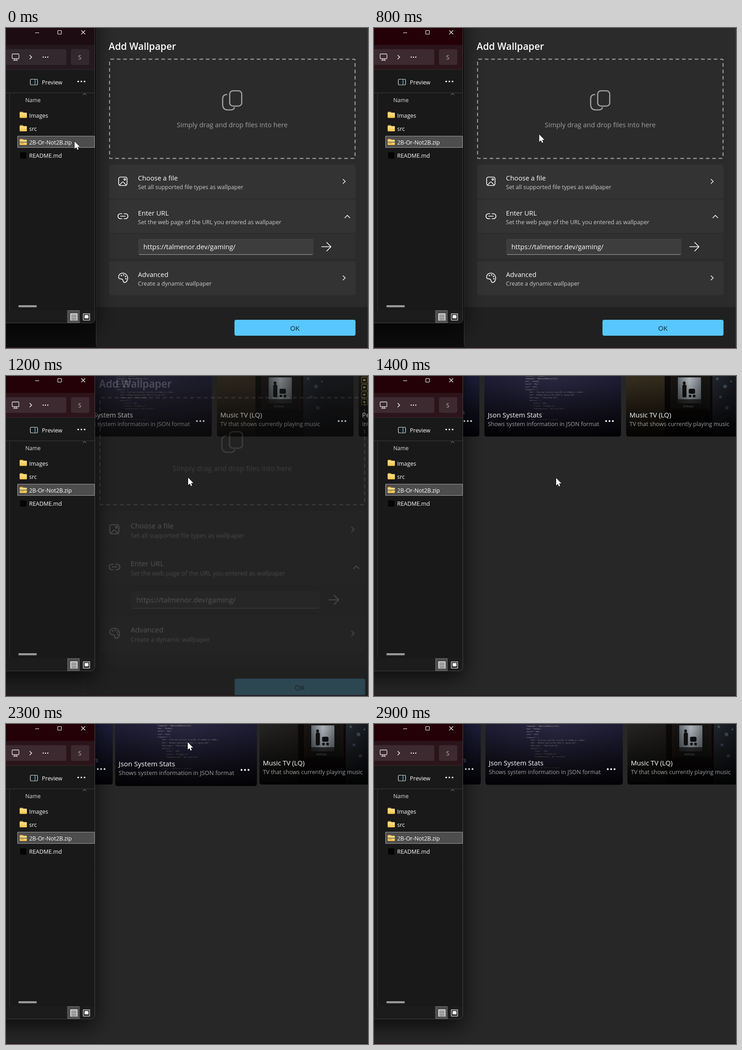
An HTML page with a canvas for the animation above (3 s loop, 797 px wide and 703 px high).

```html
<!DOCTYPE html>
<html lang="en">
<head>
<meta charset="utf-8">
<title>Add Wallpaper</title>
<style>
html, body { margin: 0; width: 100%; height: 100%; overflow: hidden; background: #272727; }
canvas { display: block; }
</style>
</head>
<body>
<canvas id="stage" width="797" height="703"></canvas>
<script>
const W = 797, H = 703, LOOP = 3000, STEP = 100;
const CARD_W = 301, PITCH = 312, CARD_BOTTOM = 133, CARD_MID = 48;
const stage = document.getElementById('stage').getContext('2d');
let c = stage;

const clamp = v => Math.max(0, Math.min(1, v));
const smooth = v => { v = clamp(v); return v * v * (3 - 2 * v); };
const lerp = (a, b, u) => a + (b - a) * u;
const mix = (a, b, u) => `rgb(${a.map((v, i) => Math.round(lerp(v, b[i], u)))})`;

function text(str, x, y, size, color, weight = 400, align = 'left') {
  c.font = `${weight} ${size}px "Open Sans", "Noto Sans", sans-serif`;
  c.textAlign = align;
  c.fillStyle = color;
  c.fillText(str, x, y);
}

function rect(x, y, w, h, color) {
  c.fillStyle = color;
  c.fillRect(x, y, w, h);
}

function box(x, y, w, h, r, fill, stroke, width = 1) {
  c.beginPath();
  c.roundRect(x, y, w, h, r);
  if (fill) { c.fillStyle = fill; c.fill(); }
  if (stroke) { c.strokeStyle = stroke; c.lineWidth = width; c.stroke(); }
}

function line(d, color = '#fff', width = 1.5) {
  c.strokeStyle = color;
  c.lineWidth = width;
  c.lineCap = c.lineJoin = 'round';
  c.stroke(new Path2D(d));
  c.lineCap = 'butt';
}

function dot(x, y, r, color) {
  c.fillStyle = color;
  c.beginPath();
  c.arc(x, y, r, 0, Math.PI * 2);
  c.fill();
}

const dots = (x, y, gap, r, color = '#fff') => [-1, 0, 1].forEach(i => dot(x + i * gap, y, r, color));

function shade(x0, y0, x1, y1, ...colors) {
  const g = c.createLinearGradient(x0, y0, x1, y1);
  colors.forEach((col, i) => g.addColorStop(i / (colors.length - 1), col));
  return g;
}

// ---- Wallpaper cards, each drawn with its left edge at x = 0 ----

const STATS = [
  '"location": "Mexico",', '"timezone": "America/Mexico_City",', '"day": "Monday",',
  '"month": "May",', '"year": 2023,', '"computer": {',
  '    "CPU": "11th Gen Intel(R) Core(TM) i9-11900H @ 2.50GHz",',
  '    "GPU": "NVIDIA GeForce RTX 3050 Ti Laptop GPU",',
  '    "RAM Usage": "7892/16202 MB",', '    "battery": {', '        "level": "100",',
  '        "status": "Plugged in",', '        "timeRemaining": "Not available"', '    }', '},',
  '"song": {', '    "status": "Nothing is playing"', '}'
];

function fadeBottom() {
  rect(0, -40, CARD_W, 175, shade(0, 10, 0, CARD_BOTTOM, 'rgba(0,0,0,0)', 'rgba(0,0,0,.5)', 'rgba(0,0,0,.92)'));
}

function statsArt() {
  rect(0, -40, CARD_W, 175, shade(0, 0, CARD_W, 0, '#1d1b31', '#28263f', '#1d1b31'));
  c.font = '3.65px "DejaVu Sans Mono", monospace';
  c.textAlign = 'left';
  STATS.forEach((s, i) => {
    c.fillStyle = i < 2 ? '#c9c3a0' : '#a9a6a0';
    c.fillText(s, 89, i * 6.03 + 0.5);
  });
  fadeBottom();
}

function musicArt(t) {
  rect(0, -40, CARD_W, 175, shade(0, 0, 90, 0, '#242321', '#1b1a18'));
  rect(190, -40, 111, 175, shade(190, 0, 240, 0, '#20242b', '#15171b'));
  const warm = 1 - clamp((t - 1400) / 400);
  rect(0, -40, 85, 175, `rgba(66,52,28,${0.55 * warm})`);
  rect(85, -40, 105, 175, '#0c0908');
  rect(98, -40, 5, 115, '#1c1411');
  rect(180, -40, 5, 115, '#1c1411');
  rect(103, -40, 77, 112, '#151413');
  rect(114, 3, 51, 57, shade(114, 0, 165, 0, '#5f666d', '#aab0b4', '#70767c'));
  c.fillStyle = '#101112';
  box(125, 12, 6, 7, 3, '#101112');
  box(124, 19, 9, 28, 3, '#101112');
  box(138, 28, 14, 11, 3, '#101112');
  dot(141, 44, 3, '#101112');
  dot(150, 44, 3, '#101112');
  rect(114, 51, 51, 9, 'rgba(15,16,17,.75)');
  text('Willows', 137, 69, 6.5, '#85888a', 400, 'center');
  [[201, 6, 3], [218, 23, 4], [208, 46, 3], [222, 70, 4], [231, 12, 2]].forEach(([x, y, r]) => dot(x, y, r, '#3d4757'));
  fadeBottom();
}

function tableArt() {
  rect(0, -40, CARD_W, 175, '#151515');
  const inks = ['#b8a04a', '#a85a50', '#9a5470', '#a87848'];
  for (let col = 0; col < 17; col++) {
    for (let row = 0; row < 4; row++) {
      if (row < 1 && col > 1) continue;
      box(6.5 + col * 16.5, 2.5 + row * 16, 13, 13, 1, null, inks[(col >> 1) % 4]);
      rect(10 + col * 16.5, 7 + row * 16, 5, 4, inks[(col >> 1) % 4]);
    }
  }
  fadeBottom();
}

function plainArt() {
  rect(0, -40, CARD_W, 175, '#1c1c38');
  fadeBottom();
  text('Live clock with moving stars', 269, 84, 12.55, '#858585', 400, 'right');
}

const CARDS = [
  { title: '', note: '', art: plainArt },
  { title: 'Json System Stats', note: 'Shows system information in JSON format', art: statsArt },
  { title: 'Music TV (LQ)', note: 'TV that shows currently playing music', art: musicArt },
  { title: 'Periodic Table', note: 'Interactive periodic table', art: tableArt }
];

function drawCards(t) {
  const slide = 1 - (1 - clamp((t - 1055) / 439)) ** 3;
  const hover = smooth((t - 2130) / 250) - smooth((t - 2540) / 450);
  CARDS.forEach((card, i) => {
    const x = -378 + i * PITCH + PITCH * slide;
    const scale = i === 1 ? 1 + 0.05 * hover : 1;
    c.save();
    c.translate(x + CARD_W / 2, CARD_MID);
    c.scale(scale, scale);
    c.translate(-CARD_W / 2, -CARD_MID);
    c.beginPath();
    c.roundRect(0, -37, CARD_W, CARD_BOTTOM + 37, 5);
    c.clip();
    card.art(t);
    text(card.title, 7.5, 91, 14.7, '#fff');
    text(card.note, 7.5, 110, 12.55, '#a0a0a0');
    dots(275.5, 99, 7.4, 2);
    c.restore();
  });
}

// ---- Dialog, painted once ----

function option(y, title, note) {
  text(title, 290.5, y + 34.5, 14.7, '#fff');
  text(note, 290.5, y + 53.5, 12.55, '#cbcbcb');
}

function paintDialog() {
  box(198.5, -30, 610, 732.5, 8, '#2b2b2b');
  c.save();
  c.clip();
  rect(198, 613, 610, 100, '#202020');
  c.restore();
  box(198.5, -30, 610, 732.5, 8, null, '#414141');
  rect(796, 0, 1, H, '#3a3a3a');

  text('Add Wallpaper', 226, 48, 21, '#fff', 600);
  c.setLineDash([8, 6]);
  box(228, 68.5, 540.5, 218, 2, null, '#aaa', 2);
  c.setLineDash([]);
  box(492.5, 138, 26.5, 33.5, 7, null, '#a0a0a0', 2.6);
  line('M486 146 Q477 147 477 155 V168 Q477 180 489 180 H494 Q501 180 503 175', '#a0a0a0', 2.6);
  text('Simply drag and drop files into here', 498, 217.5, 14.7, '#a0a0a0', 400, 'center');

  [[300, 75], [376.5, 74.5], [512, 75]].forEach(([y, h]) => box(227, y, 542.5, h, 4, '#333333'));
  box(227, 452, 542.5, 55, [0, 0, 4, 4], '#303030');
  rect(227, 451, 543, 1, '#242424');
  option(300, 'Choose a file', 'Set all supported file types as wallpaper');
  option(377, 'Enter URL', 'Set the web page of the URL you entered as wallpaper');
  option(512, 'Advanced', 'Create a dynamic wallpaper');
  line('M742 332.5 L747 337 L742 341.5 M742 544.5 L747 549 L742 553.5');
  line('M746 417 L751.5 411.5 L757 417');

  box(248, 327.5, 18.5, 18.5, 4, null, '#fff', 1.6);
  line('M250 345 L255.5 339 Q257.2 337.5 259 339 L264.5 345');
  c.beginPath();
  c.arc(261.5, 332.5, 1.8, 0, 7);
  c.stroke();

  line('M255 408 H252 A5.5 5.5 0 0 0 252 419 H255 M260 408 H263 A5.5 5.5 0 0 1 263 419 H260 M252.5 413.5 H262.5', '#fff', 1.7);

  line('M248 546 C249 538 260 536 265 542 C270 548 268 557 262 559 C257 560 259 554 256 552 C253 550 247 553 248 546 Z', '#fff', 1.6);
  [[254, 544], [259, 542.5], [263, 546], [264, 551]].forEach(([x, y]) => dot(x, y, 1.4, '#fff'));

  box(291, 463, 386, 35, 4, '#3d3d3d');
  rect(293, 497, 382, 1.2, '#9a9a9a');
  text('https://talmenor.dev/gaming/', 302.5, 486, 14.7, '#fff');
  line('M695 480.5 H715 M706 471 L715.5 480.5 L706 490', '#fff', 1.6);

  box(503, 641, 266.5, 35, 4, '#58c7ff');
  text('OK', 636, 665, 14.7, '#10222c', 400, 'center');
}

const dialog = document.createElement('canvas');
dialog.width = W;
dialog.height = H;

function drawDialog(t) {
  const leave = clamp((t - 1060) / 180);
  if (leave === 1) return;
  rect(0, 0, W, H, `rgba(0,0,0,${0.7 * (1 - leave)})`);
  c.save();
  c.globalAlpha = 1 - leave;
  c.translate(498.5, 337);
  c.scale(1 + 0.1 * leave, 1 + 0.1 * leave);
  c.drawImage(dialog, -498.5, -337);
  c.restore();
}

// ---- File explorer ----

function folder(y, zipped) {
  box(30, y, 8, 6, 1.5, '#e3a52f');
  box(30, y + 2, 16, 11.5, 1.5, shade(0, y + 2, 0, y + 13, '#ffe08a', '#f8c74a'));
  if (zipped) {
    rect(30, y + 6, 16, 2.5, '#8f8465');
    rect(31, y + 9.5, 8, 1, '#b98a2c');
  }
}

function drawExplorer(t) {
  const focus = clamp(t / 300);
  c.save();
  c.shadowColor = 'rgba(0,0,0,.75)';
  c.shadowBlur = 48;
  c.shadowOffsetY = 14;
  box(-60, -60, 255, 708, 8, '#191919');
  c.restore();

  c.save();
  c.beginPath();
  c.roundRect(-60, -60, 255, 708, 8);
  c.clip();
  rect(0, 0, 195, 38, mix([29, 13, 18], [35, 1, 7], focus));
  rect(0, 37, 195, 54, mix([35, 25, 30], [43, 20, 26], focus));
  rect(0, 90.5, 195, 1, '#3a2c30');
  rect(0, 142, 195, 1, '#3b3b3b');
  rect(7, 143, 1.5, 477, '#2e2e2e');
  rect(0, 620, 195, 28, '#1c1c1c');
  c.restore();
  box(-60, -60, 255.5, 708, 8, null, '#454545');

  line('M64.5 10.5 H72.5 M166 5.5 L174 13.5 M174 5.5 L166 13.5', '#fff', 1.1);
  box(114, 5.5, 8, 8, 1, null, '#fff', 1.1);
  const pill = mix([50, 40, 45], [61, 41, 48], focus);
  box(-8, 46.5, 141, 34.5, 4, pill);
  box(143, 46.5, 40.5, 34.5, 4, pill);
  box(13.5, 57, 15, 10.5, 2, null, '#e6e6e6', 1.3);
  line('M19 68 V71 M23 68 V71 M16.5 71.2 H25.5', '#e6e6e6', 1.2);
  line('M52.5 60 L56.5 64 L52.5 68', '#fff', 1.4);
  dots(87, 64, 5, 1.3);
  text('S', 159, 69, 12.3, '#c8c0c3');

  box(53.5, 112.5, 16, 12.5, 2.5, null, '#e0e0e0', 1.2);
  rect(63, 112.5, 1.5, 12.5, '#56b4ea');
  text('Preview', 79, 123.5, 12.5, '#fff');
  dots(166, 117.5, 7, 1.8);
  line('M169.5 147 L173 143.7 L176.5 147', '#a0a0a0', 1);
  text('Name', 42.5, 162.5, 12, '#dedede');

  rect(25, 237, 170, 26, '#4d4d4d');
  c.strokeStyle = '#a0a0a0';
  c.lineWidth = 1;
  c.strokeRect(25.5, 237.5, 171 - 1.5, 25);
  folder(184, false);
  folder(213.5, false);
  folder(243.5, true);
  box(31, 273, 14, 14, 3, '#050505');
  ['Images', 'src', '2B-Or-Not2B.zip', 'README.md'].forEach((name, i) =>
    text(name, 51, 196.5 + i * 29.6, 12.45, '#fff'));

  box(27.5, 609, 40, 4.5, 1, '#9b9b9b');
  rect(135, 620, 27, 28, '#4d4d4d');
  c.strokeStyle = '#6a6a6a';
  c.strokeRect(135.5, 620.5, 26, 27);
  box(141.5, 627, 16, 16, 1, '#dcdcdc');
  for (let y = 630; y < 642; y += 3.5) rect(143.5, y, 12, 1.3, '#3a3a3a');
  box(169.5, 627, 15.5, 15.5, 1, '#c9c9c9');
  rect(171, 628.5, 12.5, 12.5, '#222');
  rect(173, 630.5, 8.5, 7.5, '#fff');
}

// ---- Pointer: time, x, y ----

const TRACK = [
  [0, 151, 249], [100, 155, 250], [500, 267, 257], [900, 396, 226],
  [1100, 401, 223], [1400, 401, 224], [1900, 401, 226], [2500, 400, -25], [3000, 400, -25]
];

function drawPointer(t) {
  const i = TRACK.findIndex((k, n) => n && t < k[0]);
  const [t0, x0, y0] = TRACK[i - 1], [t1, x1, y1] = TRACK[i];
  const u = (t - t0) / (t1 - t0);
  const e = t0 < 1400 ? u : smooth(u);
  c.save();
  c.translate(lerp(x0, x1, e), lerp(y0, y1, e));
  const arrow = new Path2D('M0 0 V16.5 L3.8 13 L6.2 18.5 L8.8 17.3 L6.5 12 H11.6 Z');
  c.lineWidth = 1.2;
  c.strokeStyle = '#000';
  c.stroke(arrow);
  c.fillStyle = '#fff';
  c.fill(arrow);
  c.restore();
}

function render(now) {
  const t = Math.floor(now % LOOP / STEP) * STEP;
  rect(0, 0, W, H, '#272727');
  drawCards(t);
  drawDialog(t);
  rect(0, 701, W, 2, '#231a1e');
  drawExplorer(t);
  drawPointer(t);
}

c = dialog.getContext('2d');
paintDialog();
c = stage;

const start = performance.now();
function tick() {
  render(performance.now() - start);
  requestAnimationFrame(tick);
}
tick();
</script>
</body>
</html>
```
